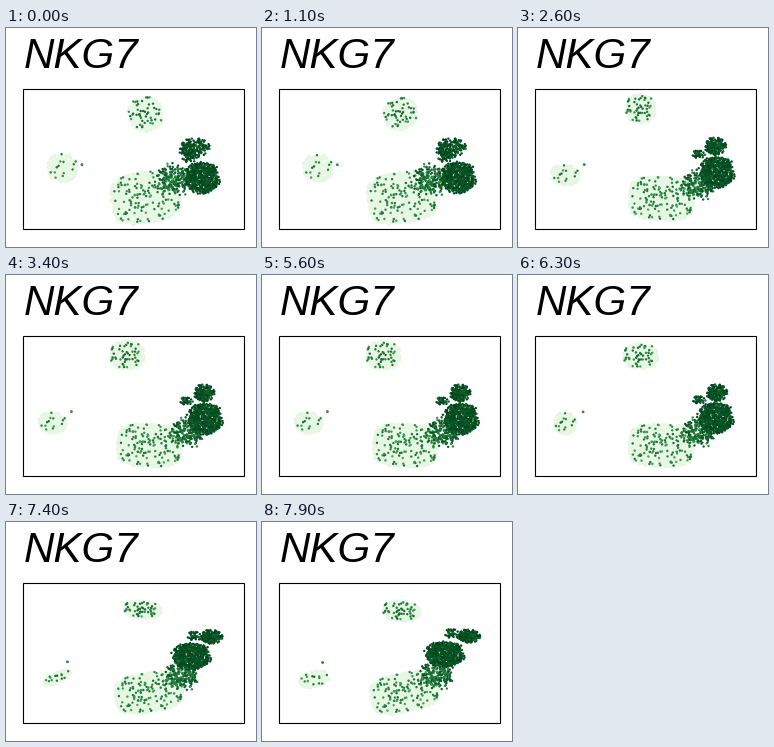
A matplotlib script that plays this animation: 250 px wide and 219 px high, repeating every 8000 ms.

```python
import numpy as np
import matplotlib.pyplot as plt
from matplotlib.animation import FuncAnimation
from matplotlib.patches import Rectangle

W, H, DPI = 250, 219, 100
FRAMES, INTERVAL = 80, 100
LEG = 30                  # frames from one view to the next
FIRST, SECOND = 4, 55     # frames at which the two turns begin
PALE = "#e8f6e4"
DARK, LIGHT = np.array([0, 68, 27]) / 255, np.array([65, 171, 93]) / 255

rng = np.random.default_rng(7)


class Cloud:
    """A cluster seen in three views, each (x, y, radius u, radius v, tilt).

    squeeze tells how far radius u shrinks midway through the first turn
    and radius v midway through the second.
    """

    def __init__(self, start, rest, end, squeeze=(0, 0), power=2.2):
        self.views = np.array([start, rest, end], float)
        self.squeeze = squeeze
        self.power = power

    def sample(self, n, lean, ragged):
        """Points in a unit superellipse; lean above 1 crowds the low u side."""
        u, v = rng.random((2, 8 * n))
        p = 2 * np.column_stack([u**lean, v]) - 1
        p = p[(np.abs(p) ** self.power).sum(1) < 1][:n]
        return p + rng.normal(0, 1, p.shape) * ragged

    def place(self, pts, a, b):
        start, rest, end = self.views
        x, y, ru, rv, tilt = start + a * (rest - start) + b * (end - rest)
        ru *= 1 - self.squeeze[0] * np.sin(np.pi * a)
        rv *= 1 - self.squeeze[1] * np.sin(np.pi * b)
        c, s = np.cos(np.radians(tilt)), np.sin(np.radians(tilt))
        u, v = pts[:, 0] * ru, pts[:, 1] * rv
        return np.column_stack([x + u * c - v * s, y + u * s + v * c])


def ease(t):
    """Cubic in and out."""
    t = min(max(t, 0), 1)
    return 4 * t**3 if t < 0.5 else 1 - 4 * (1 - t) ** 3


def greens(n, low, high):
    t = low + (high - low) * rng.random((n, 1)) ** 1.5
    return DARK + t * (LIGHT - DARK)


top = Cloud((139, 86, 17, 17, 70), (121, 80, 17, 14, 0), (140, 89, 19, 10, 6),
            (0.6, 0.4))
left = Cloud((56, 139, 14, 15, -85), (46, 147, 10, 14, -85),
             (52, 157, 15, 8, -10), (0.2, 0.85))
tail = Cloud((76, 136, 3, 1, 0), (65, 136, 2, 1, -40), (60, 140, 2, 1, -40))
big = Cloud((139, 169, 34, 25, -10), (143, 170, 32, 21, 2),
            (142, 170, 34, 19, -13), power=3.5)
bridge = Cloud((168, 152, 17, 14, 0), (181, 158, 15, 13, 0),
               (174, 153, 16, 13, 0))
main = Cloud((196, 150, 16, 15, 0), (199, 144, 16, 15, 0),
             (182, 132, 18, 12, 0))
upper = Cloud((188, 120, 15, 9, -8), (198, 118, 10, 8, -8),
              (207, 114, 11, 6, 0))
small = Cloud((183, 129, 7, 6, 0), (180, 126, 6, 4, 0), (190, 111, 7, 5, 0))

fig = plt.figure(figsize=(W / DPI, H / DPI), dpi=DPI, facecolor="white")
ax = fig.add_axes([0, 0, 1, 1])
ax.set_xlim(0, W)
ax.set_ylim(H, 0)
ax.axis("off")
ax.text(18, 40.4, "NKG7", fontsize=30.3, style="italic",
        family="Liberation Sans", va="baseline", ha="left")
ax.add_patch(Rectangle((17, 61), 221, 140, fill=False, ec="black",
                       lw=0.8, zorder=5))

layers = []


def add(cloud, n, shade=None, lean=1, ragged=0):
    """Scatter n dots in a range of greens, or a pale ground without one."""
    pts = cloud.sample(n, lean, ragged)
    color = greens(len(pts), *shade) if shade else PALE
    dots = ax.scatter(pts[:, 0], pts[:, 1], s=3 if shade else 7,
                      c=color, linewidths=0)
    layers.append((dots, cloud, pts))


for cloud, n in (top, 300), (left, 170), (big, 1000):
    add(cloud, n)
add(top, 48, (0.35, 1), lean=1.4)
add(left, 13, (0.35, 1))
add(tail, 2, (0.35, 0.8))
add(big, 140, (0.4, 1), lean=0.75)
add(bridge, 190, (0.1, 0.8), lean=0.8, ragged=0.12)
add(small, 36, (0, 0.4), ragged=0.1)
add(upper, 190, (0, 0.3), ragged=0.08)
add(main, 580, (0, 0.3), ragged=0.08)


def draw(frame):
    a, b = ease((frame - FIRST) / LEG), ease((frame - SECOND) / LEG)
    for dots, cloud, pts in layers:
        dots.set_offsets(cloud.place(pts, a, b))
    return [layer[0] for layer in layers]


anim = FuncAnimation(fig, draw, frames=FRAMES, interval=INTERVAL, repeat=True)
plt.show()
```
